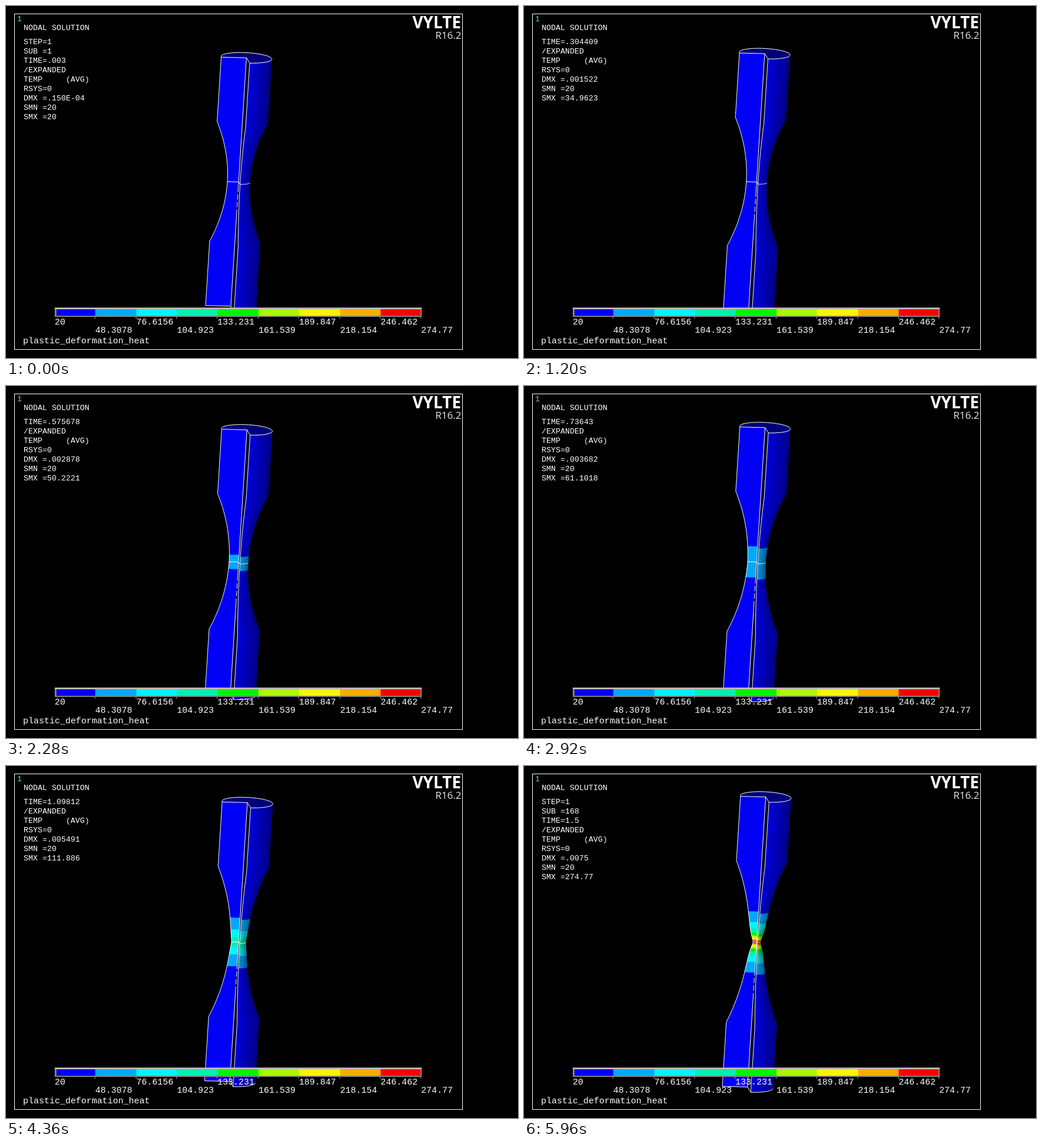
An HTML page with a canvas that plays this animation: 872 by 600 pixels, repeating every 6 s.

```html
<!DOCTYPE html>
<html lang="en">
<head>
<meta charset="utf-8">
<title>Nodal solution</title>
<style>
html, body { margin: 0; width: 100%; height: 100%; overflow: hidden; background: #000; }
canvas { display: block; }
</style>
</head>
<body>
<canvas id="stage" width="872" height="600"></canvas>
<script>
const ctx = document.getElementById('stage').getContext('2d');
const STEPS = 150, STEP_MS = 40, LAST = STEPS - 1;
const MONO = '"Liberation Mono", "Courier New", monospace';
const SANS = '"Open Sans", "Noto Sans", sans-serif';
const COLORS = ['#0000f5', '#00a8fc', '#00f4fc', '#00f0b0', '#00f400',
  '#acf800', '#f8f400', '#f8ac00', '#f80000'];
const LABELS = ['20', '48.3078', '76.6156', '104.923', '133.231', '161.539',
  '189.847', '218.154', '246.462', '274.77'];

// Step at which each contour appears, and its final half height
const CONTOURS = [[54, 52], [89.5, 34], [105.5, 23], [118, 16], [129, 11],
  [136, 8], [141, 5], [145.5, 2.5]];
// Maximum temperature: [step, value]
const HEAT = [[0, 20], [30, 34.9623], [57, 50.2221], [89, 75.9153],
  [109, 111.886], [132, 170.804], [149, 274.77]];

// Projection: the axis, and the two cut planes as conjugate radii
const CX = 396.2, CY = 300, LEAN = 0.0627, R = 43;
const A = [-43, -1.1], B = [5.5, 9];
const FRONT = Math.PI / 2, EDGE = Math.PI * 0.96, FULL = Math.PI * 2;

let u = 0, shoulder = 102, end = 212;

function radius(d) {
  d = Math.abs(d);
  if (d >= shoulder) return R;
  const base = 19.2 - 8.5 * u + 3.3 * u * u;
  const dip = 8 * u ** 3.6 * Math.exp(-(Math.hypot(d, 3) - 3) / 17);
  return base + (R - base) * (d / shoulder) ** (2 + 0.1 * u) - dip;
}

function axis(d) {
  return [CX - d * LEAN, CY + d];
}

function point(d, angle) {
  const k = radius(d) / R, c = Math.cos(angle) * k, s = Math.sin(angle) * k;
  const [x, y] = axis(d);
  return [x + c * A[0] + s * B[0], y + c * A[1] + s * B[1]];
}

function along(d0, d1, angle) {
  const n = Math.max(4, Math.ceil(Math.abs(d1 - d0) / 2.5));
  return Array.from({ length: n + 1 }, (_, i) => point(d0 + (d1 - d0) * i / n, angle));
}

function arc(d, from, to) {
  return Array.from({ length: 33 }, (_, i) => point(d, from + (to - from) * i / 32));
}

function trace(points) {
  ctx.beginPath();
  points.forEach(p => ctx.lineTo(p[0], p[1]));
}

function fill(points, color) {
  trace(points);
  ctx.fillStyle = color;
  ctx.fill();
}

function line(points) {
  trace(points);
  ctx.stroke();
}

function skin(d0, d1, from) {
  return [...arc(d0, from, EDGE), ...along(d0, d1, EDGE),
    ...arc(d1, EDGE, from), ...along(d1, d0, from)];
}

function band(d0, d1, color) {
  fill([...along(d0, d1, 0), axis(d1), axis(d0)], color);
  fill(skin(d0, d1, FRONT), color);
}

function drawPart(step) {
  band(-end, end, COLORS[0]);
  CONTOURS.forEach(([start, size], i) => {
    if (step <= start) return;
    const h = size * ((step - start) / (LAST - start)) ** 0.42;
    band(-h, h, COLORS[i + 1]);
  });

  // Nested layers darken the skin toward its right edge
  fill(skin(-end, end, FRONT), 'rgba(0,0,0,0.13)');
  for (let i = 1; i < 12; i++) {
    fill(skin(-end, end, FRONT + (EDGE - FRONT) * i / 12), 'rgba(0,0,0,0.05)');
  }
  fill([axis(-end), ...along(-end, end, FRONT), axis(end)], '#00002c');
  fill([axis(-end), ...arc(-end, FRONT, FULL)], '#000078');

  ctx.strokeStyle = '#fff';
  ctx.lineWidth = 1;
  line([axis(-end), ...arc(-end, FRONT, FULL), axis(-end)]);
  line(along(-end, end, 0));
  line(along(-end, end, FRONT));
  line([point(end, 0), axis(end), ...arc(end, FRONT, EDGE)]);
  line([point(0, 0), axis(0), ...arc(0, FRONT, EDGE)]);

  const gap = 8 + 40 * u;
  line([axis(-end), axis(gap)]);
  ctx.setLineDash([9, 4]);
  line([axis(gap), axis(gap + 42)]);
  ctx.setLineDash([]);
  line([axis(gap + 42), axis(end)]);
}

function text(str, x, y, font, color = '#fff', align = 'left') {
  ctx.font = font;
  ctx.fillStyle = color;
  ctx.textAlign = align;
  ctx.fillText(str, x, y);
}

function rect(x, y, w, h, color) {
  ctx.fillStyle = color;
  ctx.fillRect(x, y, w, h);
}

function drawLegend() {
  const edge = i => Math.round(83 + i * 69.37);
  rect(83, 514, 625, 16, '#808080');
  rect(83, 514, 625, 3, '#bcb4b0');
  COLORS.forEach((color, i) => {
    const x = i ? edge(i) : 86, right = i < 8 ? edge(i + 1) : 706;
    rect(x, 517, right - x, 11, color);
  });
  LABELS.forEach((label, i) => {
    if (i) rect(edge(i) - 1, 530, 1, 3, '#a0a0a0');
    text(label, edge(i), i % 2 ? 557 : 543, '15px ' + MONO);
  });
}

function format(v) {
  if (v < 0.001) {
    const e = Math.floor(Math.log10(v)) + 1;
    return (v / 10 ** e).toFixed(3).slice(1) + 'E-0' + -e;
  }
  return String(+(v < 1 ? v.toFixed(6) : v.toPrecision(6))).replace(/^0/, '');
}

function slope(i) {
  const a = HEAT[Math.max(0, i - 1)], b = HEAT[Math.min(HEAT.length - 1, i + 1)];
  return (b[1] - a[1]) / (b[0] - a[0]);
}

function maxHeat(step) {
  let i = 0;
  while (i < HEAT.length - 2 && step >= HEAT[i + 1][0]) i++;
  const [x0, y0] = HEAT[i], [x1, y1] = HEAT[i + 1];
  const w = x1 - x0, t = (step - x0) / w, q = 1 - t;
  return y0 * (1 + 2 * t) * q * q + y1 * t * t * (3 - 2 * t)
    + w * t * q * (slope(i) * q - slope(i + 1) * t);
}

function drawInfo(step) {
  const time = 0.003 + 1.497 * u;
  const rows = ['TIME=' + format(time), '/EXPANDED', 'TEMP     (AVG)', 'RSYS=0',
    'DMX =' + format(time * 0.005), 'SMN =20', 'SMX =' + format(maxHeat(step))];
  if (step === 0) rows.unshift('STEP=1', 'SUB =1');
  if (step === LAST) rows.unshift('STEP=1', 'SUB =168');
  const font = '13.33px ' + MONO;
  text('NODAL SOLUTION', 30, 41, font);
  rows.forEach((row, i) => text(row, 30, 65 + i * 16, font));
}

function draw(step) {
  u = step / LAST;
  shoulder = 102 + 35.5 * u;
  end = 211.7 + 35.5 * u;
  rect(0, 0, 872, 600, '#000');
  drawPart(step);
  drawLegend();
  drawInfo(step);
  text('plastic_deformation_heat', 29, 575, '15px ' + MONO);
  text('1', 19, 26, '13.33px ' + MONO, '#50d0e8');
  text('VYLTE', 775, 38, 'bold 28px ' + SANS, '#fff', 'right');
  text('R16.2', 775.5, 56, '17px ' + SANS, '#e8e8e8', 'right');
  ctx.strokeStyle = '#fff';
  ctx.lineWidth = 1;
  ctx.strokeRect(14.5, 13.5, 763, 572);
}

function tick() {
  draw(Math.floor(performance.now() / STEP_MS) % STEPS);
  requestAnimationFrame(tick);
}
tick();
</script>
</body>
</html>
```
